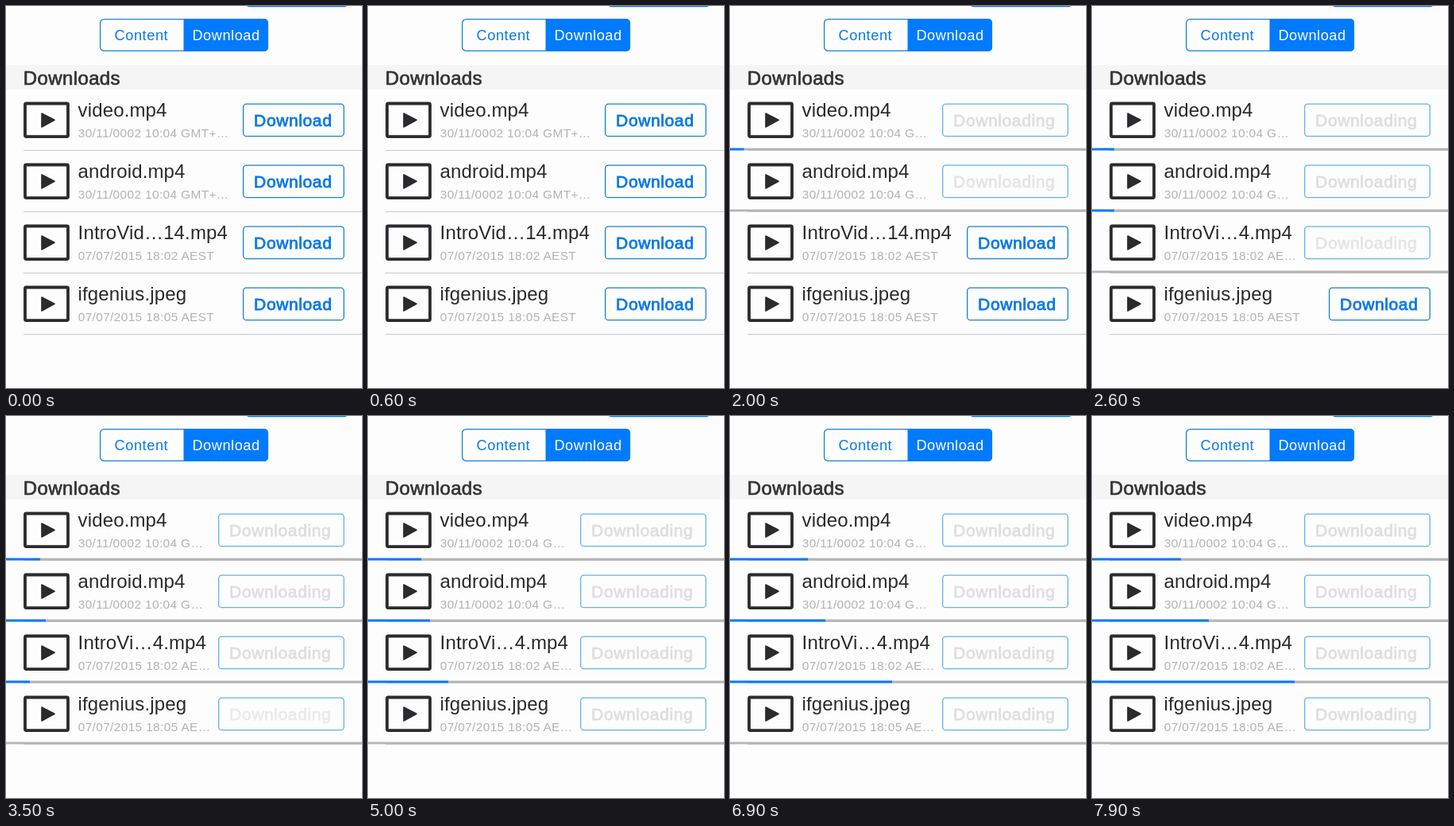
Write an HTML page that moves like this. It is 448 px wide and 480 px high and loops after 8 s.

```html
<!DOCTYPE html>
<html lang="en">
<head>
<meta charset="utf-8">
<title>Downloads</title>
<style>
  html, body { margin: 0; width: 100%; height: 100%; overflow: hidden; background: #fdfdfd; }
  svg { display: block; width: 448px; height: 480px; font-family: "Liberation Sans", Arial, sans-serif; }
  .tab { font-size: 18.2px; letter-spacing: .55px; }
  .head { font-size: 24px; letter-spacing: .4px; fill: #333336; stroke: #333336; stroke-width: .7; }
  .name { font-size: 24px; letter-spacing: .14px; fill: #29292b; }
  .date { font-size: 15.4px; letter-spacing: .38px; fill: #b2b2b2; }
  /* regular glyphs with a thin outline give a medium weight */
  .label { font-size: 21px; letter-spacing: .62px; fill: #0a78e6; stroke: #0a78e6; stroke-width: .8; }
  .blue { fill: #007aff; }
  .line { fill: none; stroke: #1a80d8; stroke-width: 1.3; }
  .busy .line { stroke: #62b2ee; }
  .busy .label { fill: #dedede; stroke: #dedede; }
</style>
</head>
<body>
<svg id="stage" viewBox="0 0 448 480">
  <rect width="448" height="480" fill="#fdfdfd"/>
  <rect class="blue" x="303" y="-8" width="126" height="9.3" rx="3"/>
  <rect x="118.6" y="16.6" width="210.8" height="39.8" rx="5" fill="#fdfdfd" stroke="#1a80d8" stroke-width="1.3"/>
  <path class="blue" d="M223.5 16H325a5 5 0 0 1 5 5V52a5 5 0 0 1-5 5H223.5Z"/>
  <text class="tab" x="136.6" y="43" fill="#0a78e6">Content</text>
  <text class="tab" x="234.4" y="43" fill="#fff">Download</text>
  <rect y="74" width="448" height="31" fill="#f5f5f5"/>
  <text class="head" x="21.7" y="99">Downloads</text>
</svg>
<script>
const LOOP = 8000, STEP = 100, PITCH = 77;

// tap: when the download starts; bar: [time, width] points
const rows = [
  { name: ['video.mp4', 'video.mp4'], date: ['30/11/0002 10:04 GMT+…', '30/11/0002 10:04 G…'],
    tap: 1200, bar: [[1500, 0], [1800, 14], [2600, 28], [3500, 43], [5000, 67], [6900, 98], [7900, 112]] },
  { name: ['android.mp4', 'android.mp4'], date: ['30/11/0002 10:04 GMT+…', '30/11/0002 10:04 G…'],
    tap: 1800, bar: [[2000, 0], [2600, 28], [3500, 50], [5000, 78], [6900, 120], [7900, 147]] },
  { name: ['IntroVid…14.mp4', 'IntroVi…4.mp4'], date: ['07/07/2015 18:02 AEST', '07/07/2015 18:02 AE…'],
    tap: 2400, bar: [[2800, 0], [3500, 30], [5000, 101], [6900, 204], [7900, 255]] },
  { name: ['ifgenius.jpeg', 'ifgenius.jpeg'], date: ['07/07/2015 18:05 AEST', '07/07/2015 18:05 AE…'],
    tap: 3400, bar: [[LOOP, 0]] }
];

const stage = document.getElementById('stage');

function add(parent, tag, attrs, text) {
  const el = document.createElementNS('http://www.w3.org/2000/svg', tag);
  for (const key in attrs) el.setAttribute(key, attrs[key]);
  if (text) el.textContent = text;
  return parent.appendChild(el);
}

function addState(g, row, busy) {
  const state = add(g, 'g', { class: busy ? 'busy' : 'idle' });
  const x = busy ? 267.6 : 298.6;
  add(state, 'text', { class: 'name', x: 90.6, y: 138.7 }, row.name[busy]);
  add(state, 'text', { class: 'date', x: 90.7, y: 164.5 }, row.date[busy]);
  add(state, 'rect', { class: 'line', x, y: 123.1, width: 425.2 - x, height: 40.6, rx: 4 });
  const label = add(state, 'text', { class: 'label', x: x + 13.5, y: 150.8 }, busy ? 'Downloading' : 'Download');
  return { state, label };
}

rows.forEach((row, i) => {
  const g = add(stage, 'g', { transform: `translate(0 ${i * PITCH})` });
  add(g, 'rect', { x: 24, y: 122.5, width: 54, height: 41.6, rx: 1.5, fill: '#fdfdfd', stroke: '#2b2b2e', 'stroke-width': 3.8 });
  add(g, 'path', { d: 'M45 135L61 143.3L45 152Z', fill: '#2b2b2e', stroke: '#2b2b2e', 'stroke-width': 1.6, 'stroke-linejoin': 'round' });
  add(g, 'rect', { x: 22, y: 181, width: 426, height: 1, fill: '#c8c8c8' });
  row.idle = addState(g, row, 0);
  row.busy = addState(g, row, 1);
  row.track = add(row.busy.state, 'rect', { y: 178.6, width: 448, height: 2.8, fill: '#b5b5b5' });
  row.fill = add(row.busy.state, 'rect', { class: 'blue', y: 178.6, width: 0, height: 2.8 });
});

function barWidth(points, t) {
  if (t <= points[0][0]) return points[0][1];
  for (let i = 1; i < points.length; i++) {
    const [t0, w0] = points[i - 1], [t1, w1] = points[i];
    if (t <= t1) return w0 + (w1 - w0) * (t - t0) / (t1 - t0);
  }
  return points[points.length - 1][1];
}

function draw(now) {
  const t = Math.floor(now % LOOP / STEP) * STEP;
  for (const row of rows) {
    const busy = t >= row.tap;
    row.idle.state.setAttribute('display', busy ? 'none' : 'inline');
    row.busy.state.setAttribute('display', busy ? 'inline' : 'none');
    row.busy.label.setAttribute('opacity', Math.min(1, .4 + Math.max(0, t - row.tap) / 500));
    row.fill.setAttribute('width', barWidth(row.bar, t));
  }
}

const start = performance.now();
function tick() {
  draw(performance.now() - start);
  requestAnimationFrame(tick);
}
tick();
</script>
</body>
</html>
```
